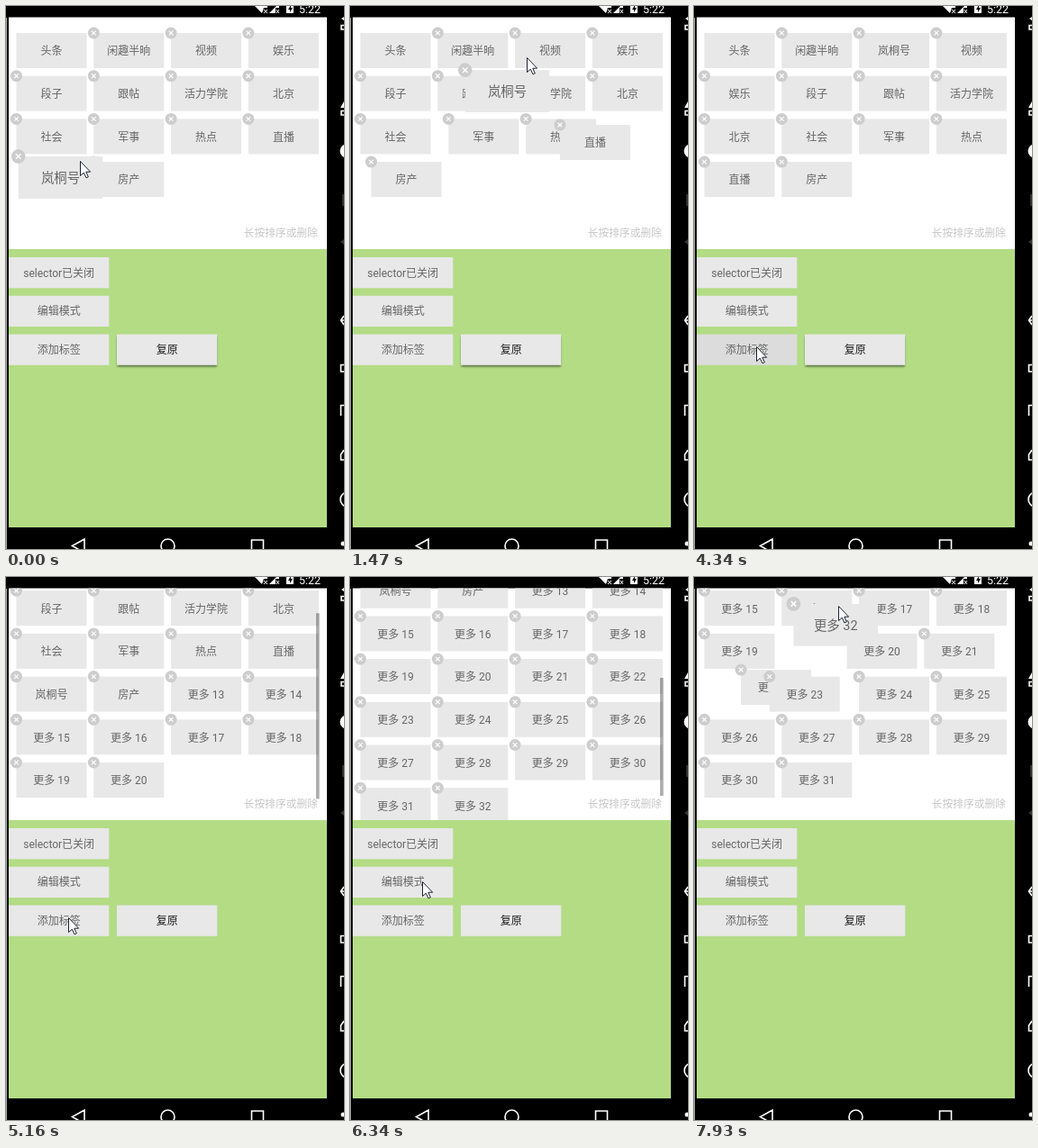
An HTML page that plays this animation: 375x603 px, repeating every 8 s.

```html
<!DOCTYPE html>
<html lang="zh-CN">
<head>
<meta charset="utf-8">
<title>Tag sorting</title>
<style>
html, body { margin: 0; width: 100%; height: 100%; overflow: hidden; background: #000; }
svg { display: block; width: 375px; height: 603px; }
text { font: 12px Roboto, "Noto Sans CJK SC", "Noto Sans CJK", sans-serif; text-anchor: middle; fill: #666; }
.box { fill: #e8e8e8; }
.line { fill: none; stroke: #fff; stroke-width: 1.6; }
.white { fill: #fff; }
.hint { font-size: 11.75px; text-anchor: end; fill: #c6c6c6; }
.clock { font-size: 12.5px; text-anchor: start; fill: #fff; }
.strong { font-weight: 500; fill: #1c1c1c; }
</style>
</head>
<body>
<svg viewBox="0 0 375 603">
  <defs>
    <clipPath id="view"><path d="M3 12.5H356V270H3Z"/></clipPath>
    <filter id="blur" x="-10%" y="-30%" width="120%" height="160%"><feGaussianBlur stdDeviation="0.8"/></filter>
  </defs>
  <rect width="375" height="603"/>
  <path d="M.5 13V603" stroke="#aaa"/>
  <path class="white" d="M3 12.5H356V270H3Z"/>
  <path d="M3 270H356V579H3Z" fill="#b3dc85"/>

  <!-- status bar -->
  <path class="white" d="M276 0H290V2H286L284 8Z M292 8L303 -3V2H299V8Z M311 -2H319V8H311Z"/>
  <path d="M286 4l4 4m0-4l-4 4M300 4l3 4m0-4l-3 4" stroke="#fff"/>
  <path d="M316 -1L313 4H315V7L318 2H316Z"/>
  <text class="clock" x="325" y="7.5">5:22</text>

  <!-- navigation bar -->
  <path class="line" d="M87 592L73.5 599.5L87 607Z M272.5 593H285.5V607H272.5Z"/>
  <circle class="line" cx="179.5" cy="599.5" r="7.5"/>

  <!-- side toolbar -->
  <path class="line" d="M375 344L371.5 349L375 354M372 349H375M375 398.5H371.5V406H375M375 443.5H371.5V455M375 493L371.5 498V504H375M375 21.5H372V26H375M375 116.5H372V121H375"/>
  <circle class="line" cx="379" cy="548" r="8"/>
  <path class="white" d="M372 14L375 12V16Z M371 113L375 106V113Z"/>
  <circle class="white" cx="378" cy="161" r="7.5"/>
  <circle class="white" cx="374" cy="597" r="2.5"/>
  <path d="M373 209H375V222H373Z M371 262L375 259V265Z" fill="#333"/>

  <text class="hint" x="346" y="255.5">长按排序或删除</text>
  <g clip-path="url(#view)">
    <g id="list"></g>
    <rect id="bar" x="344" width="3.7" fill="#000" fill-opacity=".32"/>
  </g>
  <rect id="shade" x="123.5" y="367" width="110.5" height="33.5" fill="#000" fill-opacity=".5" filter="url(#blur)"/>
  <g id="buttons"></g>
  <path id="cursor" d="M.5 .5V16.5L4.3 13.2L7 18.8L9.3 17.8L6.8 12.2H11.6Z" fill="#fff" stroke="#1d2233"/>
</svg>
<script>
const LOOP = 8000, REFRESH = 135, MOVE = 250, LAG = 40;
const ROW = 47.7, COL = 85.8;
const $ = id => document.getElementById(id);

const names = '头条 闲趣半晌 视频 娱乐 段子 跟帖 活力学院 北京 社会 军事 热点 直播 岚桐号 房产'.split(' ');
for (let n = 13; n <= 32; n++) names.push('更多 ' + n);

// the screen refreshes at a steady pace, counted anew from each start
const starts = [0, 120, 1200, 2290, 3410, 4460, 5160, 5430, 6340, 7480];
const clicks = [4460, 5160, 5430, 5700, 5970];

// [time, x, y]
const pointer = [
  [120, 82, 172], [650, 262, 40], [1060, 158, 183], [1300, 196, 138], [1470, 196, 57], [1640, 235, 33],
  [2250, 235, 33], [2960, 145, 374], [3410, 127, 300], [4200, 69, 378],
  [6300, 69, 378], [6340, 80, 338], [6650, 150, 232], [7350, 137, 222], [7480, 137, 222], [7885, 160, 32]
];

// gaps: [time, slot kept free]; grip: pointer to tag centre
const first = {
  tag: 12, from: 0, to: 2250, grip: [-21.5, 18.5],
  gaps: [[0, 12], [320, 9], [560, 2], [820, 9], [980, 13], [1409, 9], [1600, 2]]
};
const second = {
  tag: 33, from: 7480, to: LOOP, grip: [-0.5, 2.5],
  gaps: [0, 1, 2, 3].map(k => [7400 + 100 * k, 33 - 4 * k])
};

const clamp = v => Math.max(0, Math.min(1, v));
const mix = (a, b, k) => a + (b - a) * k;
const mix2 = (p, q, k) => [mix(p[0], q[0], k), mix(p[1], q[1], k)];
const ease = k => (1 - Math.cos(Math.PI * clamp(k))) / 2;

function pointerAt(t) {
  const j = pointer.findIndex(p => p[0] > t);
  if (j <= 0) return pointer.at(j).slice(1);
  const [a, ...p] = pointer[j - 1], [b, ...q] = pointer[j];
  return mix2(p, q, (t - a) / (b - a));
}

const slot = s => [50.5 + COL * (s % 4), 49.5 + ROW * Math.floor(s / 4)];

// place of tag i after gap change k; a new move starts from wherever the tag is
function place(i, drag, k, t) {
  const rank = i < drag.tag ? i : i - 1;
  const target = n => rank + (rank >= drag.gaps[n][1]);
  if (!k) return slot(target(0));
  if (target(k) === target(k - 1)) return place(i, drag, k - 1, t);
  const start = drag.gaps[k][0];
  return mix2(place(i, drag, k - 1, start), slot(target(k)), ease((t - start) / MOVE));
}

function make(parent, type, attrs, text = '') {
  const el = document.createElementNS('http://www.w3.org/2000/svg', type);
  for (const k in attrs) el.setAttribute(k, attrs[k]);
  el.textContent = text;
  return parent.appendChild(el);
}

const tags = names.map((name, i) => {
  const g = make($('list'), 'g', {});
  make(g, 'rect', { class: 'box', x: -39, y: -19.5, width: 78, height: 39 });
  make(g, 'text', { y: 4.8 }, name);
  if (i) {
    make(g, 'circle', { cx: -39, cy: -19.5, r: 6.5, fill: '#cdcdcd' });
    make(g, 'path', { d: 'M-41.3-21.8l4.6 4.6m0-4.6l-4.6 4.6', stroke: '#fff', 'stroke-width': 1.2 });
  }
  return g;
});
$('list').append(tags[first.tag]);

function button(text, col, row, style = '') {
  const x = 3 + 120 * col, y = 279 + 42.75 * row;
  const box = make($('buttons'), 'rect', { class: 'box', x, y, width: 111.3, height: 34.3 });
  make($('buttons'), 'text', { class: style, x: x + 55.7, y: y + 21.7 }, text);
  return box;
}
button('selector已关闭', 0, 0);
button('编辑模式', 0, 1);
const add = button('添加标签', 0, 2);
button('复原', 1, 2, 'strong');

function draw(t) {
  const pages = clicks.filter(c => c <= t).length;
  const drag = pages ? second : first;
  const held = t >= drag.from && t < drag.to;
  const step = Math.max(0, drag.gaps.filter(g => g[0] <= t).length - 1);

  // each click adds a row and scrolls to the end; the last row is pulled up by hand
  const count = 14 + 4 * pages;
  let scroll = Math.max(0, ROW * (3 + pages) - 176);
  if (pages === clicks.length) scroll -= 28.2 * (1 - ease((t - 6660) / 240));

  tags.forEach((g, i) => {
    const own = i === drag.tag;
    let [x, y] = own ? slot(drag.gaps[step][1]) : place(i, drag, step, t);
    y -= scroll;
    let size = 1;
    if (own && held) {
      [x, y] = pointerAt(t - LAG).map((v, k) => v + drag.grip[k]);
      size = 1.2;
    }
    g.style.display = i < count ? '' : 'none';
    g.setAttribute('transform', `translate(${x} ${y}) scale(${size})`);
  });

  const k = (scroll - 110.2) / 67.2;
  $('bar').setAttribute('y', mix(70, 112, k));
  $('bar').setAttribute('height', mix(175, 131, k));
  $('bar').style.opacity = pages < 2 ? 0 : 1 - clamp((t - 7000) / 200);
  $('shade').style.display = pages ? 'none' : '';
  add.style.fill = t > 4200 && t < 4590 ? '#dcdcdc' : '';
  $('cursor').setAttribute('transform', `translate(${pointerAt(t)})`);
}

let shown = -1;
function frame() {
  const now = performance.now() % LOOP + 5;
  const start = starts.filter(s => s <= now).pop();
  const t = start + Math.floor((now - start) / REFRESH) * REFRESH;
  if (t !== shown) draw(shown = t);
  requestAnimationFrame(frame);
}
frame();
</script>
</body>
</html>
```
